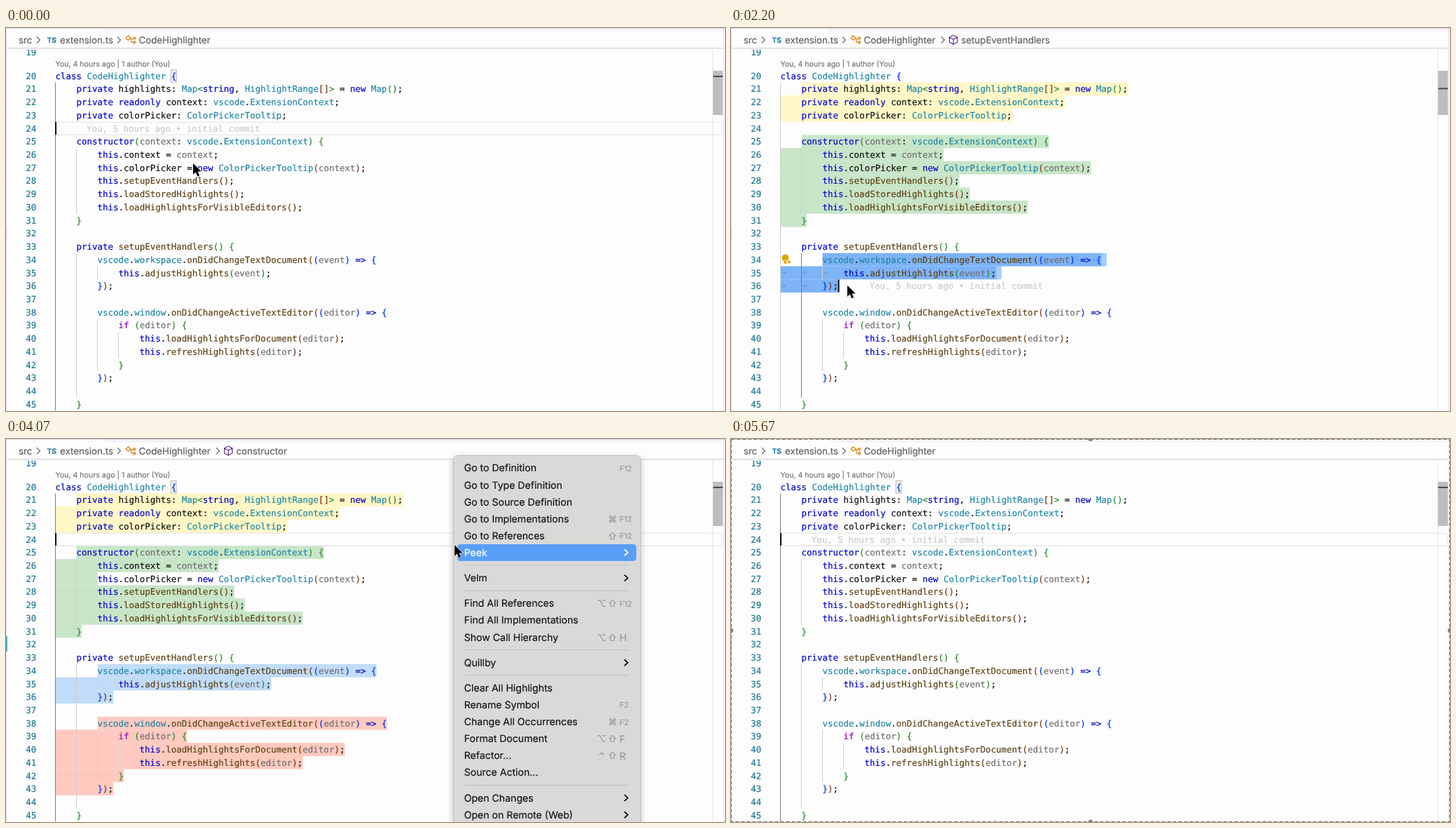
An HTML page for the animation above (5.74 s loop, 1026x546 px).

```html
<!DOCTYPE html>
<html lang="en">
<head>
<meta charset="utf-8">
<title>Code highlighter</title>
<style>
  html, body { margin: 0; width: 100%; height: 100%; overflow: hidden; background: #fdfdfd; }
  svg { display: block; }
  text { white-space: pre; text-rendering: geometricPrecision; }
  text, tspan { fill: currentColor; stroke: currentColor; stroke-width: .2px; }
  .mono { font: 12.475px "DejaVu Sans Mono", monospace; }
  .ui { font-family: Inter, "DejaVu Sans", sans-serif; }
  .panel { filter: drop-shadow(0 3px 5px rgba(0, 0, 0, .25)); }
  #sel { mix-blend-mode: multiply; }
</style>
</head>
<body>
<svg width="1026" height="546" viewBox="0 0 1026 546">
  <rect width="1026" height="546" fill="#fdfdfd"/>
  <g id="marks"></g>
  <g id="sel"></g>
  <g id="guides"></g>
  <g id="code" class="mono"></g>
  <g id="over"></g>
  <g id="frame"></g>
  <g id="crumb" class="ui"></g>
  <g id="menu" class="ui"></g>
  <g id="pointer"></g>
</svg>
<script>
const LOOP = 5740, STEP = 1000 / 15;
const X0 = 70.5, CW = 7.51, TOP = 58.8, LH = 18.72, FIRST = 20;
const $ = id => document.getElementById(id);
const X = col => X0 + col * CW;
const Y = line => TOP + (line - FIRST) * LH;
const esc = s => s.replace(/&/g, '&amp;').replace(/</g, '&lt;').replace(/>/g, '&gt;');
const rect = (x, y, w, h, fill, more = '') =>
  `<rect x="${x}" y="${y}" width="${w}" height="${h}" fill="${fill}" ${more}/>`;
const text = (x, y, s, color, more = '') => `<text x="${x}" y="${y}" color="${color}" ${more}>${s}</text>`;
const path = (d, stroke, w = 1, more = '') =>
  `<path d="${d}" fill="none" stroke="${stroke}" stroke-width="${w}" ${more}/>`;

const lines = `class CodeHighlighter {
    private highlights: Map<string, HighlightRange[]> = new Map();
    private readonly context: vscode.ExtensionContext;
    private colorPicker: ColorPickerTooltip;

    constructor(context: vscode.ExtensionContext) {
        this.context = context;
        this.colorPicker = new ColorPickerTooltip(context);
        this.setupEventHandlers();
        this.loadStoredHighlights();
        this.loadHighlightsForVisibleEditors();
    }

    private setupEventHandlers() {
        vscode.workspace.onDidChangeTextDocument((event) => {
            this.adjustHighlights(event);
        });

        vscode.window.onDidChangeActiveTextEditor((editor) => {
            if (editor) {
                this.loadHighlightsForDocument(editor);
                this.refreshHighlights(editor);
            }
        });

    }`.split('\n');
const LAST = FIRST + lines.length - 1;
const lineAt = n => lines[n - FIRST];

// Syntax colours
const KEYWORDS = /^(class|private|readonly|constructor|this|new|string|=>)$/;
const BRACKETS = ['#0431fa', '#2c8a2c', '#7b3814'];
let depth = 0;
function tint(tok, before, after) {
  if (KEYWORDS.test(tok)) return '#0606cc';
  if (tok === 'if') return '#8f08c4';
  if (/^[({[<]$/.test(tok)) return BRACKETS[depth++ % 3];
  if (/^[)}\]>]$/.test(tok)) return BRACKETS[--depth % 3];
  if (/^[A-Z]|^(vscode|workspace|window)$/.test(tok)) return '#2287a6';
  if (/^[a-z]/.test(tok) && after[0] === '(') return '#5f4519';
  if (/^(event|editor)$/.test(tok)) return '#707070';
  if (tok === 'context' && !/(\.|readonly )$/.test(before)) return '#707070';
  return '#111';
}
function paint(src) {
  let out = '';
  for (const m of src.matchAll(/=>|[A-Za-z]+|\s+|./g)) {
    const tok = m[0], end = m.index + tok.length;
    out += `<tspan color="${tint(tok, src.slice(0, m.index), src.slice(end))}">${esc(tok)}</tspan>`;
  }
  return out;
}
const lineNo = (n, y) => text(43.2, y, n, '#237893', 'text-anchor="end"');

$('code').innerHTML = lineNo(19, 38.6) + lines.map((src, i) => {
  const y = Y(FIRST + i) + 13.9;
  return lineNo(FIRST + i, y) + text(X0, y, paint(src), '#111');
}).join('') + text(X0, 54.9, 'You, 4 hours ago | 1 author (You)', '#777',
  'class="ui" font-size="10.6"');

// Drag selections: press and release time, start, time and colour of the highlight
const drags = [
  { t0: 330, t1: 600, line: 21, col: 4, mark: 760, last: 23, fill: '#fff7c6' },
  { t0: 1000, t1: 1330, line: 25, col: 4, mark: 1520, last: 31, fill: '#c8e5c8' },
  { t0: 1780, t1: 2050, line: 34, col: 8, mark: 2130, last: 36, fill: '#c0dcf9' },
  { t0: 2480, t1: 2780, line: 38, col: 8, mark: 2870, last: 43, fill: '#fecabf' },
  { t0: 3080, t1: 3350, line: 27, col: 8, mark: 3500 },
];
const UNMARK = 3500, MENU_ON = 3950, MENU_OFF = 4800, CLEAR = 4870, DASH = 5200;

// Pointer: time, x, y
const moves = [
  [0, 267, 194], [90, 267, 194], [320, 102, 86], [340, 102, 86], [600, 402, 124], [790, 402, 124],
  [980, 102, 162], [1010, 102, 162], [1330, 160, 285], [1540, 160, 285], [1770, 131, 329],
  [1790, 131, 329], [2050, 166, 368], [2260, 166, 368], [2470, 131, 405], [2490, 131, 405],
  [2780, 155, 498], [2890, 155, 498], [3060, 131, 199], [3090, 131, 199], [3266, 460, 191],
  [3350, 517, 196], [3560, 517, 196], [3860, 637, 143], [3960, 637, 143], [4060, 640, 152],
  [4120, 640, 152], [4600, 706, 362], [4790, 706, 362], [5150, 560, -25],
];
function pointerAt(t) {
  const i = moves.findIndex(m => m[0] > t);
  if (i < 0) return moves[moves.length - 1].slice(1);
  const [ta, xa, ya] = moves[i - 1], [tb, xb, yb] = moves[i];
  const u = (t - ta) / (tb - ta), e = u * u * (3 - 2 * u);
  return [xa + (xb - xa) * e, ya + (yb - ya) * e];
}
function caretAt(t) {
  const [x, y] = pointerAt(t);
  const line = Math.max(FIRST, Math.min(LAST, FIRST + Math.floor((y - TOP) / LH)));
  const col = Math.max(0, Math.min(lineAt(line).length, Math.round((x - X0) / CW)));
  return { line, col };
}

// Calls fn(line, from, to) for each line of a range
function eachLine(a, b, fn) {
  for (let n = a.line; n <= b.line; n++) {
    fn(n, n === a.line ? a.col : 0, n === b.line ? b.col : lineAt(n).length);
  }
}
const band = (n, from, to, fill) => rect(X(from), Y(n), Math.max(0, to - from) * CW, LH + .05, fill);

function drawMarks(t) {
  let out = '';
  if (t < CLEAR) for (const d of drags) {
    if (!d.fill || t < d.mark) continue;
    eachLine(d, { line: d.last, col: lineAt(d.last).length }, (n, from, to) => {
      out += band(n, from, n === 27 && t >= UNMARK ? 8 : to, d.fill);
    });
  }
  return out;
}

function drawSelection(drag, caret) {
  let bands = '', blanks = '';
  if (!drag) return [bands, blanks];
  const back = caret.line < drag.line || (caret.line === drag.line && caret.col < drag.col);
  const [a, b] = back ? [caret, drag] : [drag, caret];
  eachLine(a, b, (n, from, to) => {
    bands += band(n, from, to + (n < b.line ? 1 : 0), '#a6d0fd');
    const src = lineAt(n), lead = src.search(/\S|$/), y = Y(n) + LH / 2;
    for (let c = from; c < to; c++) {
      if (c < lead) {
        if (c % 4 === 0) blanks += path(`M${X(c) + 1} ${y}h6m-2.3 -2.3l2.3 2.3l-2.3 2.3`, '#5f7f9c', .8, 'opacity=".7"');
      } else if (src[c] === ' ') {
        blanks += `<circle cx="${X(c + .5)}" cy="${y}" r=".9" fill="#5f7f9c" opacity=".7"/>`;
      }
    }
  });
  return [bands, blanks];
}

// Indent guides: column, first and last line
const guides = [[0, 21, 45], [4, 26, 30], [4, 34, 44], [8, 35, 35], [8, 39, 42], [12, 40, 41]];
function drawGuides(line) {
  const inside = guides.filter(g => g[0] < 8 && line >= g[1] && line <= g[2]);
  const active = inside[inside.length - 1];
  return guides.map(g =>
    path(`M${Math.floor(X(g[0])) + .5} ${Y(g[1])}V${Y(g[2] + 1)}`, g === active ? '#7d7d7d' : '#cfcfcf')).join('');
}

function bulb(line) {
  const y = Y(line) + LH / 2;
  return `<g transform="translate(77.5 ${y})" fill="#dba800"><circle cy="-2.5" r="5"/>
    <path d="M-2.4 1h4.8v5h-4.8zM5.5 -1l1.2 3 3 1.2-3 1.2-1.2 3-1.2-3-3-1.2 3-1.2z" stroke="#fdfdfd" stroke-width=".6"/></g>`;
}

// Breadcrumb
const chevron = x => path(`M${x - 2} 12.5l4.5 4.5l-4.5 4.5`, '#6a6a6a', 1.2);
const crumbText = (x, s) => text(x, 21.8, s, '#616161', 'font-size="13.3"');
const cube = path('M317.3 10.3l5.7 2.9v6.9l-5.7 3.3l-5.7 -3.3v-6.9zM311.6 13.2l5.7 3.1l5.7 -3.1M317.3 16.3v7.1', '#652d90', 1.2);
const classIcon = path('M174.4 10.8l3.3 3.3l-3.4 3.4l-3 -3zM177 15.5h4M179 15.5v5h2M181.3 14.3l2 -1.6l1.7 1.7l-2 2zM181.3 20.2l2 -1.6l1.7 1.7l-2 2z', '#d67e00', 1.2);
const baseCrumb = crumbText(18, 'src') + chevron(46) + text(58.5, 20.8, 'TS', '#2f7fa6', 'font-size="10.3" font-weight="700"') +
  crumbText(77, 'extension.ts') + chevron(161) + classIcon + crumbText(189.5, 'CodeHighlighter');
function drawCrumb(t) {
  const name = t < 2100 || t > 4300 ? '' : t < 3420 ? 'setupEventHandlers' : 'constructor';
  return baseCrumb + (name && chevron(302) + cube + crumbText(328.5, name));
}

// Context menu: label, modifiers, key; '>' opens a submenu, null is a divider
const items = [
  ['Go to Definition', '', 'F12'], ['Go to Type Definition'], ['Go to Source Definition'],
  ['Go to Implementations', '⌘', 'F12'], ['Go to References', '⇧', 'F12'], ['Peek', '>'], null,
  ['Velm', '>'], null,
  ['Find All References', '⌥⇧', 'F12'], ['Find All Implementations'], ['Show Call Hierarchy', '⌥⇧', 'H'], null,
  ['Quillby', '>'], null,
  ['Clear All Highlights'], ['Rename Symbol', '', 'F2'], ['Change All Occurrences', '⌘', 'F2'],
  ['Format Document', '⌥⇧', 'F'], ['Refactor...', '⌃⇧', 'R'], ['Source Action...'], null,
  ['Open Changes', '>'], ['Open on Remote (Web)', '>'],
];
function drawMenu(px, py) {
  let out = rect(638.5, 23.5, 267, 540, '#d9d9d8', 'rx="7" stroke="#c2c2c2" class="panel"');
  let y = 29.4;
  for (const item of items) {
    if (!item) {
      out += path(`M654 ${y + 6}H889`, '#bfbfbf');
      y += 12.1;
      continue;
    }
    const [label, mods = '', key = ''] = item, mid = y + 12.05;
    const hot = px > 638 && py >= y && py < y + 24.1;
    const ink = hot ? '#fff' : '#161616';
    if (hot) out += rect(644, y, 255.5, 24.1, '#5a9ff6', 'rx="4.5"');
    out += text(653.7, mid + 5, label, ink, 'font-size="14.08"');
    if (mods === '>') out += path(`M882.5 ${mid - 4.5}l4.7 4.5l-4.7 4.5`, ink, 1.8);
    else [...mods].reverse().forEach((m, i) => {
      out += text(865.5 - i * 15.5, mid + 5, m, '#999', 'font-size="13" text-anchor="middle"');
    });
    const size = key.length > 1 ? 11 : 14;
    out += text(875.5, mid + size * .36 + .4, key, '#999', `font-size="${size}"`);
    y += 24.1;
  }
  return out;
}

function drawFrame(t, line) {
  let out = rect(0, 0, 1026, 28, '#fdfdfd') + rect(141, 0, 885, 5, '#f5f4fa') +
    path('M0 .5H1026', '#d5d3e4') + path('M.5 0V546M1024.5 0V546', '#dedcec') +
    rect(0, 28, 1026, 1, '#dedede') + rect(0, 29, 1026, 1, '#ececec') + rect(0, 30, 1026, 1, '#f6f6f6') +
    path('M1008.5 31V546', '#e6e6e6') + rect(1009, 61, 14, 63, '#bdbdbd') +
    rect(1009, 68 + (line - 24) * 1.45, 14, 2, '#4a4a4a');
  out += t >= UNMARK && t < CLEAR ? rect(0, 281, 2, 22, '#5aa7d6') : rect(0, 283, 1.2, 20, '#cfcdea');
  if (t >= DASH) {
    out += rect(.5, .5, 1025, 545, 'none', 'stroke="#707070" stroke-dasharray="5 3"');
    for (const [x, y] of [[513, 0], [513, 546], [0, 273], [1026, 273]])
      out += `<circle cx="${x}" cy="${y}" r="3.2" fill="#808080"/>`;
  }
  return out;
}

function render(t) {
  const drag = t < MENU_ON ? drags.filter(d => d.t0 <= t).pop() : null;
  const caret = drag ? caretAt(Math.min(t, drag.t1)) : { line: 24, col: 0 };
  const [px, py] = pointerAt(t);
  const [bands, blanks] = drawSelection(drag, caret);
  const held = drag && t < drag.t1;

  $('marks').innerHTML = drawMarks(t) + (drag ? '' :
    rect(72, Y(24) + .7, 950, LH - 1, 'none', 'stroke="#e2e2e2"') +
    rect(X(22) - .5, Y(20) + .7, CW + .5, LH - 1, '#ececec', 'stroke="#bdbdbd"'));
  $('sel').innerHTML = bands;
  $('guides').innerHTML = drawGuides(caret.line);

  let over = blanks;
  const blame = drag ? caret.line !== 32 && (drag.line === 27 || t > drag.t1 + 100)
    : t < MENU_ON || t > 4300;
  if (blame) over += text(X(lineAt(caret.line).length) + 44.5, Y(caret.line) + 13.9,
    'You, 5 hours ago • initial commit', '#cbcbcb', 'class="mono"');
  const lit = t < MENU_ON && drags.filter(d => d.t1 + 130 <= t).pop();
  if (lit) over += bulb(lit.line);
  over += rect(X(caret.col) - .5, Y(caret.line) + .2, 2, LH - .6, '#111');
  $('over').innerHTML = over;

  $('frame').innerHTML = drawFrame(t, caret.line);
  $('crumb').innerHTML = drawCrumb(t);
  $('menu').innerHTML = t >= MENU_ON && t < MENU_OFF ? drawMenu(px, py) : '';
  $('pointer').innerHTML = (held ? `<circle cx="${px - 1}" cy="${py}" r="23.5" fill="none" stroke="#1a1a1a" stroke-width="1.8"/>` : '') +
    `<path transform="translate(${px} ${py - 1})" d="M0 0V16L3.7 12.6L6.3 18.4L9.1 17.2L6.6 11.5H11.6Z" fill="#000" stroke="#fff" stroke-width="1.2" paint-order="stroke"/>`;
}

const start = performance.now();
let shown = -1;
function tick() {
  const t = (performance.now() - start) % LOOP;
  const step = Math.floor(t / STEP + .01);
  if (step !== shown) render((shown = step) * STEP);
  requestAnimationFrame(tick);
}
tick();
</script>
</body>
</html>
```
